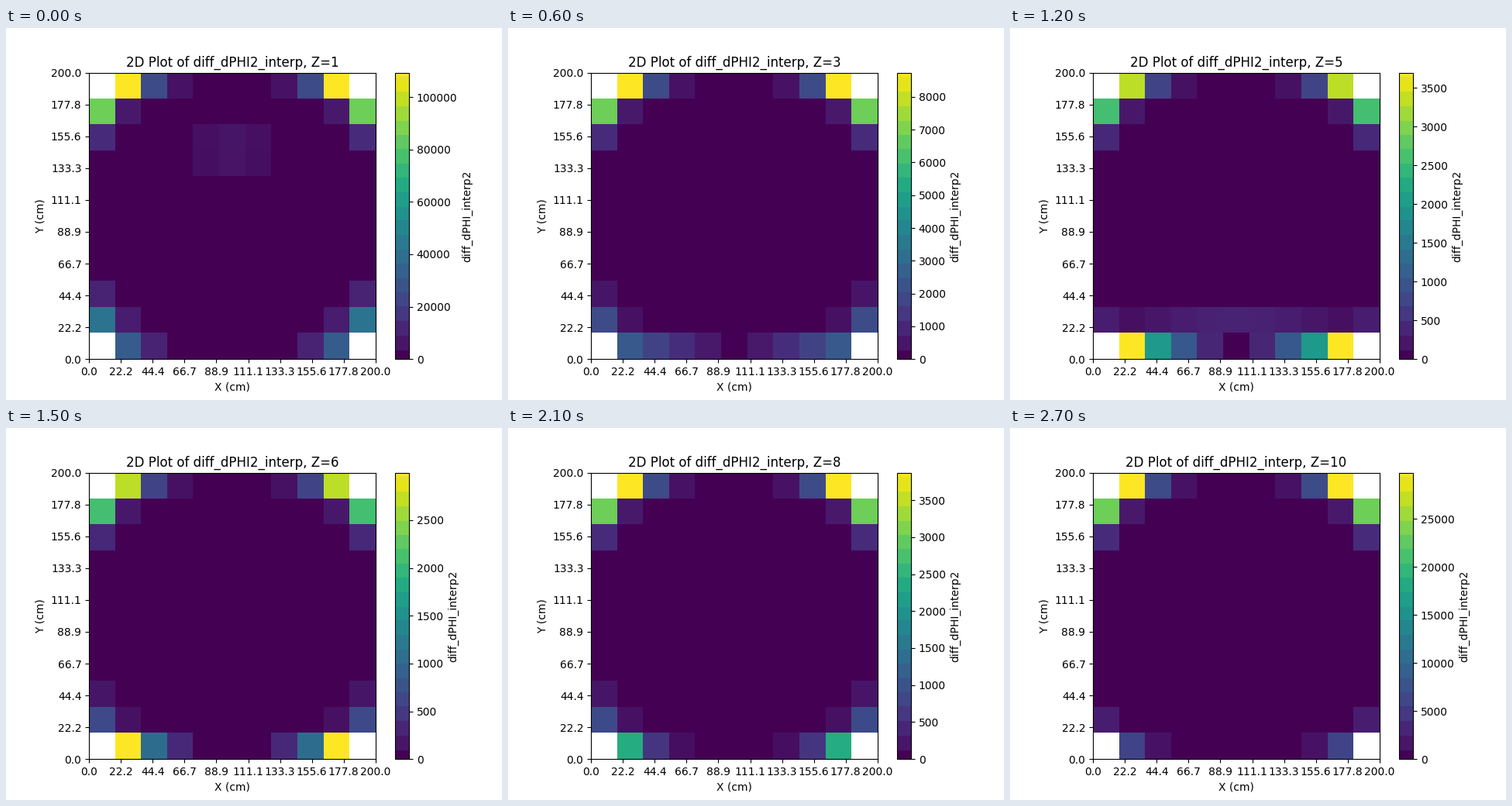
A matplotlib script for the animation above (3 s loop, 640 by 480 pixels).

```python
import numpy as np
import matplotlib.pyplot as plt
from matplotlib.animation import FuncAnimation
from matplotlib.cm import ScalarMappable
from matplotlib.colors import ListedColormap, Normalize

CELLS = 11
SIZE = 200
BANDS = 20
CUTOFF = .037

# Key points along Z: scale maximum, and strength of the lower edge and sides.
KEY_Z = (1, 3, 5, 6, 7, 9, 10)
KEY_MAX = (109300, 8740, 3694, 2998, 2612, 5738, 29800)
KEY_BOTTOM = (.29, .28, 1, 1, .88, .36, .2)
KEY_SIDE = (.38, .23, .075, .22, .27, .18, .08)

row, col = np.mgrid[:CELLS, :CELLS]
from_side = np.minimum(col, CELLS - 1 - col)
middle = CELLS // 2


def bump(x, centre, width):
    return np.exp(-((x - centre) / width) ** 2 / 2)


def corner(depth, edge, side, edge_decay, side_decay, inward):
    """Field fading along an edge and up the sides from both its corners."""
    along = np.maximum(from_side - 1, 0)
    taper = 1 - (along / (middle - 1)) ** 4
    edge_row = edge * edge_decay ** along * taper
    sides = side * side_decay ** np.maximum(depth - 1, 0) * inward ** from_side
    return np.where(depth == 0, edge_row, sides)


def glow(centre_row, width, height):
    return bump(col, middle, width) * bump(row, centre_row, height)


def field(z):
    """Grid of slice z, relative to its own maximum."""
    top = 1 - .14 * bump(z, 5.5, .6)
    bottom = np.interp(z, KEY_Z, KEY_BOTTOM)
    side = np.interp(z, KEY_Z, KEY_SIDE)
    spread = .25 + .5 * bump(z, 3.6, 1.35)

    upper = corner(row, top, .78 * top, .23, .16, .09)
    lower = corner(CELLS - 1 - row, bottom, side, spread, .25, .2)
    low_glow = .14 * bump(z, 4.4, .7) * glow(9, 3, .7) * (row < CELLS - 1)
    high_glow = .062 * bump(z, 1, .8) * glow(2.4, 1.3, 1)

    grid = np.maximum.reduce([upper, lower, low_glow, high_glow])
    grid[::CELLS - 1, ::CELLS - 1] = np.nan
    grid /= np.nanmax(grid)
    grid[grid < CUTOFF] = 0
    return grid


def scale_maximum(z):
    return np.exp(np.interp(z, KEY_Z, np.log(KEY_MAX)))


def banded_viridis():
    steps = (np.arange(256) + .5) / 256
    band = np.floor(steps * BANDS + .35)
    shade = np.where(band > 0, (band + .15) / BANDS, 0)
    return ListedColormap(plt.get_cmap("viridis")(np.minimum(shade, .99)))


plt.rcParams["font.family"] = "DejaVu Sans"
fig, ax = plt.subplots(figsize=(6.4, 4.8), dpi=100)
image = ax.imshow(np.zeros((CELLS, CELLS)), cmap="viridis", vmin=0, vmax=1,
                  extent=(0, SIZE, 0, SIZE), interpolation="nearest")
scale = ScalarMappable(Normalize(0, 1), banded_viridis())
fig.colorbar(scale, ax=ax, label="diff_dPHI_interp2")

ticks = np.linspace(0, SIZE, 10)
labels = [f"{t:.1f}" for t in ticks]
ax.set_xticks(ticks, labels)
ax.set_yticks(ticks, labels)
ax.set_xlabel("X (cm)")
ax.set_ylabel("Y (cm)")


def update(frame):
    z = frame + 1
    image.set_data(np.ma.masked_invalid(field(z)))
    scale.set_clim(0, scale_maximum(z))
    ax.set_title(f"2D Plot of diff_dPHI2_interp, Z={z}")
    return ()


animation = FuncAnimation(fig, update, frames=10, interval=300,
                          repeat=True, repeat_delay=0, blit=False)
plt.show()
```
